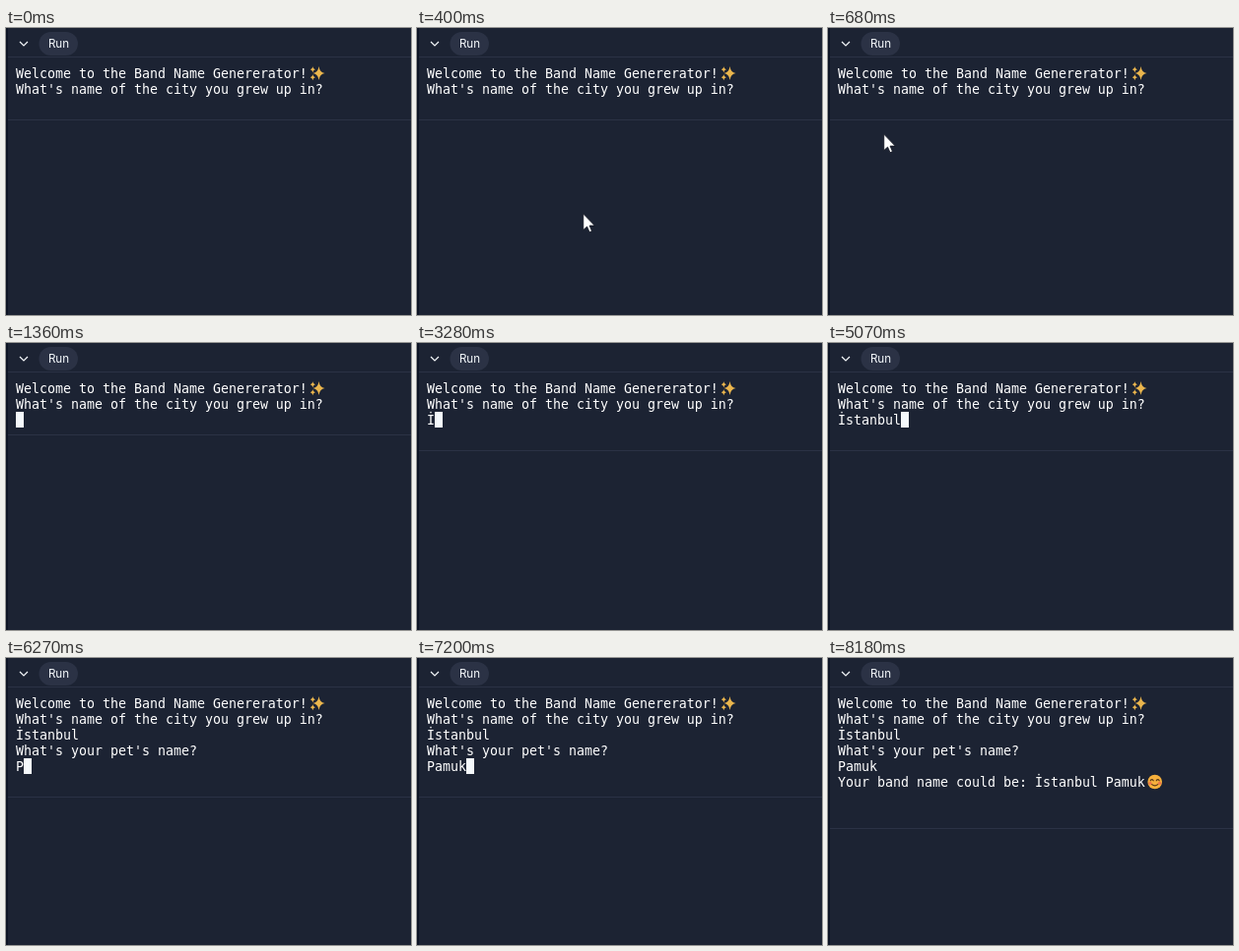
Recreate the animation shown at these times as an HTML page. Size 411 by 292 pixels, loop 9.77 s.

```html
<!DOCTYPE html>
<html lang="en">
<head>
<meta charset="utf-8">
<title>Band name generator</title>
<style>
html, body { margin: 0; width: 100%; height: 100%; overflow: hidden; background: #1c2333; }
svg { display: block; width: 100%; height: 100%; }
.term text { font: 13.29px "DejaVu Sans Mono", monospace; fill: #fff; }
.run { font: 11.6px Inter, sans-serif; fill: #f5f9fc; text-anchor: middle; }
.rule { stroke: #2b3245; }
</style>
</head>
<body>
<svg viewBox="0 0 411 292">
  <rect width="411" height="292" fill="#1c2333"/>
  <rect width="2" height="292" fill="#0e1525"/>
  <path d="M14 14L18 18L22 14" fill="none" stroke="#f5f9fc" stroke-width="1.2"/>
  <rect x="33.5" y="4" width="39.5" height="24" rx="12" fill="#2b3245"/>
  <text class="run" x="53.5" y="20">Run</text>
  <path class="rule" d="M2 29.5H411"/>
  <path class="rule" id="foot" d="M2 .5H411"/>
  <g class="term" id="term"></g>
  <g fill="#eab54d">
    <path d="M317.5 39Q318.3 45.2 323.5 46Q318.3 46.8 317.5 53Q316.7 46.8 311.5 46Q316.7 45.2 317.5 39Z"/>
    <path d="M311.3 39.2Q311.7 41.8 313.8 42.2Q311.7 42.6 311.3 45.2Q310.9 42.6 308.8 42.2Q310.9 41.8 311.3 39.2Z"/>
    <path d="M311.3 47.2Q311.7 49.8 313.8 50.2Q311.7 50.6 311.3 53.2Q310.9 50.6 308.8 50.2Q310.9 49.8 311.3 47.2Z"/>
  </g>
  <g id="smile" transform="translate(331.7 126)" fill="none" stroke="#5c3a18" stroke-width="1.2" stroke-linecap="round">
    <circle r="7.3" fill="#f6b03c" stroke="none"/>
    <g fill="#f0764a" stroke="none"><circle cx="-4.8" cy="1.4" r="1.7"/><circle cx="4.8" cy="1.4" r="1.7"/></g>
    <path d="M-4.5 -1.2Q-3 -3.6 -1.5 -1.2M1.5 -1.2Q3 -3.6 4.5 -1.2M-3 2.6Q0 5.2 3 2.6"/>
  </g>
  <rect id="block" width="8" height="16" fill="#f5f9fc"/>
  <path id="mouse" d="M0 0V16.5L3.8 13L6.3 18.6L8.7 17.5L6.3 12H11.5Z" fill="#fff" stroke="#10141f" stroke-width=".8"/>
</svg>
<script>
const LOOP = 9770, CELL = 8, ROW = 16, LEFT = 10, TOP = 38;
const FOCUS = 1020, HIDE = 1360, CITY_DONE = 5540, PET_DONE = 8180;
const city = { word: 'İstanbul', keys: [3280, 3620, 3890, 4020, 4150, 4410, 4610, 5070] };
const pet = { word: 'Pamuk', keys: [6270, 6530, 6790, 6990, 7200] };
const $ = id => document.getElementById(id);
const show = (el, on) => el.setAttribute('visibility', on ? 'visible' : 'hidden');
const move = (el, x, y) => el.setAttribute('transform', `translate(${x} ${y})`);
const typed = (entry, t) => entry.word.slice(0, entry.keys.filter(k => k <= t).length);

const rows = Array.from({ length: 6 }, (_, i) => {
  const el = document.createElementNS('http://www.w3.org/2000/svg', 'text');
  el.setAttribute('x', LEFT);
  el.setAttribute('y', TOP + i * ROW + 13);
  return $('term').appendChild(el);
});

function mouseAt(t) {
  if (t < FOCUS) {
    // fast approach that slows down near the prompt
    const left = 1 - Math.min(10, Math.floor((t - 190) / 69)) / 10;
    return [34 + 285 * left ** 2.1, 75 + 192 * left ** 1.46];
  }
  const u = Math.min(4, Math.floor((t - FOCUS) / 68) + 1) / 4;
  return [34 + 31 * u, 75 + 66 * u];
}

function draw(t) {
  const asked = t >= CITY_DONE, done = t >= PET_DONE;
  const first = typed(city, t), second = typed(pet, t);
  const lines = [
    'Welcome to the Band Name Genererator!',
    "What's name of the city you grew up in?",
    first,
    asked ? "What's your pet's name?" : '',
    second,
    done ? `Your band name could be: ${city.word} ${pet.word}` : ''
  ];
  rows.forEach((el, i) => {
    if (el.textContent !== lines[i]) el.textContent = lines[i];
  });

  const input = asked ? second : first;
  const y = TOP + ROW * (asked ? 4 : 2);
  move($('block'), LEFT + input.length * CELL, y);
  show($('block'), t >= FOCUS && !done);
  move($('foot'), 0, done ? 173 : y + 23 + (input ? ROW : 0));
  show($('smile'), done);

  const moving = t >= 190 && t < HIDE;
  show($('mouse'), moving);
  if (moving) move($('mouse'), ...mouseAt(t));
}

const start = performance.now();
function tick() {
  draw((performance.now() - start) % LOOP);
  requestAnimationFrame(tick);
}
tick();
</script>
</body>
</html>
```
